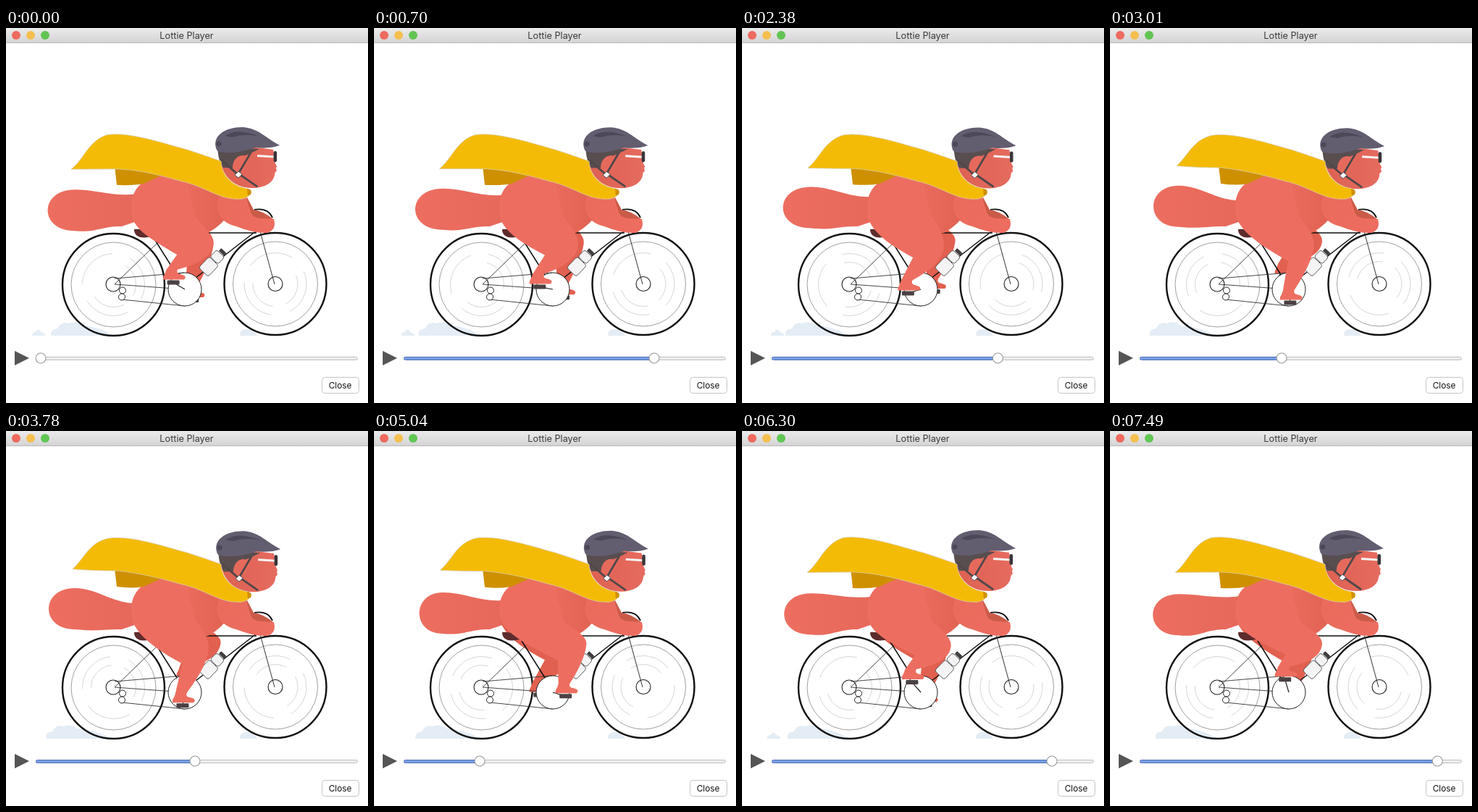
Write an HTML page with a canvas that moves like this. It is 500 by 518 pixels and loops after 7.56 s.

```html
<!DOCTYPE html>
<html lang="en">
<head>
<meta charset="utf-8">
<title>Lottie Player</title>
<style>
html, body { margin: 0; width: 100%; height: 100%; overflow: hidden; background: #fff; }
canvas { display: block; }
</style>
</head>
<body>
<canvas id="stage" width="500" height="518"></canvas>
<script>
const ctx = document.getElementById('stage').getContext('2d');
const LOOP = 7560, STEP = 70, RANGE = 431, TURN = Math.PI * 2;
const REST = 0.838 * TURN;
const SKIN = '#ed6e60', FAR_SKIN = '#e2604f', INK = '#111';
const HUB = { x: 247, y: 361 };

// the playback speed drifts: [time in ms, px travelled by the slider]
const PACE = [[0, 0], [1400, 678], [3010, 1482], [3780, 1937], [5040, 2684], [6300, 3397], [LOOP, 9 * RANGE]];

function travelled(t) {
  const i = PACE.findIndex(([time]) => time > t);
  const [t0, d0] = PACE[i - 1], [t1, d1] = PACE[i];
  return d0 + (d1 - d0) * (t - t0) / (t1 - t0);
}

const rad = deg => deg * Math.PI / 180;
const wave = (phase, peak) => Math.cos(phase - rad(peak));

// the knee follows the foot around the crank
function legPose(phase) {
  const a = phase - rad(79) + rad(14) * Math.sin(phase);
  const dx = 18.5 * Math.cos(a), dy = 18.5 * Math.sin(a);
  return {
    x: HUB.x + dx, y: HUB.y + dy,
    kx: 288 + 0.42 * dx - 0.4 * dy, ky: 299 - 0.25 * dx + 0.25 * dy,
    bx: 245 + 0.5 * dx, by: 315 + 0.35 * dy
  };
}

function shape(path, fill, stroke, width = 1) {
  const p = new Path2D(path);
  if (fill) { ctx.fillStyle = fill; ctx.fill(p); }
  if (stroke) { ctx.strokeStyle = stroke; ctx.lineWidth = width; ctx.stroke(p); }
}

function circle(x, y, r, ...paint) {
  shape(`M${x + r} ${y}A${r} ${r} 0 1 1 ${x - r} ${y}A${r} ${r} 0 1 1 ${x + r} ${y}Z`, ...paint);
}

function box(x, y, w, h, r, fill, stroke, width = 1) {
  ctx.beginPath();
  ctx.roundRect(x, y, w, h, r);
  ctx.fillStyle = fill;
  ctx.fill();
  if (stroke) { ctx.strokeStyle = stroke; ctx.lineWidth = width; ctx.stroke(); }
}

function label(text, x, y, size, color) {
  ctx.font = `${size}px Inter, sans-serif`;
  ctx.textAlign = 'center';
  ctx.fillStyle = color;
  ctx.fillText(text, x, y);
}

function gradient(x0, y0, x1, y1, from, to) {
  const g = ctx.createLinearGradient(x0, y0, x1, y1);
  g.addColorStop(0, from);
  g.addColorStop(1, to);
  return g;
}

function wheel(x, y, turn) {
  circle(x, y, 70.5, null, INK, 2.4);
  circle(x, y, 58.5, null, '#777', 0.7);
  ctx.strokeStyle = '#ccc';
  ctx.lineWidth = 0.8;
  for (let i = 0; i < 5; i++) {
    const from = turn + i * 2.1;
    ctx.beginPath();
    ctx.arc(x, y, i % 2 ? 31 : 43, from, from + 1.5);
    ctx.stroke();
  }
}

function clouds(phase) {
  const x = 59 - 4 * wave(phase, 150), c = '#e4edf5';
  shape(`M${x} 425Q${x - 2} 416 ${x + 9} 415Q${x + 13} 405 ${x + 24} 408Q${x + 34} 404 ${x + 43} 411Q${x + 66} 412 148 425Z`, c);
  if (phase > 3.4 && phase < 5.7) {
    const p = 62 - phase * 5;
    shape(`M${p} 425Q${p} 420 ${p + 5} 420Q${p + 9} 413 ${p + 13} 420Q${p + 18} 421 ${p + 19} 425Z`, c);
  }
  shape('M323 425Q322 417 331 416Q340 414 347 425Z', c);
}

function leg({ x, y, kx, ky, bx, by }, color) {
  box(x - 8.5, y - 3, 17, 6, 1, '#4b4142');
  shape(`M173 250C171 278 ${bx - 32} ${by - 17} ${bx} ${by}L${x - 10} ${y - 17}
    C${x - 11} ${y - 11} ${x - 15} ${y - 9} ${x - 14} ${y - 4}H${x + 15}
    Q${x + 20} ${y - 9} ${x + 11} ${y - 11}Q${x + 3} ${y - 12} ${x + 6} ${y - 18}
    Q${kx - 3} ${ky + 22} ${kx} ${ky}C${kx + 3} ${ky - 13} 272 272 262 262
    L250 215C195 190 174 225 173 250Z`, color);
}

function tail(phase) {
  const x = 60 + 4 * wave(phase, 75) - 12;
  const y = 250.5 + 4.5 * wave(phase, 10);
  const top = 232.5 - 5.5 * wave(phase, -15);
  shape(`M195 ${top - 2}C155 ${top + 8} 130 ${y - 29} 95 ${y - 29}
    C${x} ${y - 29} ${x} ${y + 28} 95 ${y + 28}
    C125 ${y + 31} 130 274 160 274L195 262Z`,
    gradient(60, 0, 185, 0, SKIN, '#e6685a'));
}

function bike(foot) {
  shape('M150 354L210 296M150 354L247 361M150 346L246 338M160 375L247 384', null, '#333', 0.9);
  circle(148, 354, 10, null, '#222', 1.1);
  circle(161, 362.5, 4.5, '#fff', '#222', 1);
  circle(160, 371.5, 4.5, '#fff', '#222', 1);
  shape('M200 283H346M204 290L238 344M346 280L262 345', null, INK, 1.5);
  shape('M351 281L371 354', null, '#333', 1);
  circle(372, 353.5, 10, null, '#222', 1.1);
  shape('M343 251Q362 248 368 262', null, INK, 1.8);
  shape('M177 278Q190 276 204 287Q188 292 181 287Q177 284 177 278Z', '#5d2c2c');
  circle(HUB.x, HUB.y, 23, '#fff', '#222', 1);
  shape(`M${HUB.x} ${HUB.y}L${foot.x} ${foot.y}`, null, '#222', 1.2);

  ctx.save();
  ctx.translate(279.5, 330);
  ctx.rotate(0.76);
  box(-9, -11, 18, 21, 3, '#f4f4f4', '#555', 0.9);
  box(-8, -25, 15, 13, 3, '#f4f4f4', '#555', 0.9);
  box(-5, -31, 10, 5, 1, '#433f40');
  ctx.restore();
}

function head() {
  shape(`M295 172C294 200 312 221 340 221C358 221 370 213 371 202Q371 199 374 197
    Q372 193 374 191Q371 187 371 182L369 168L310 160Z`,
    gradient(300, 0, 372, 0, '#dd6253', '#e66b5f'));
  shape('M292 164Q293 185 300 193L314 193Q320 178 336 174L350 167Z', '#584e4f');
  shape('M313 194C312 184 319 175 328 176Q336 178 335 185L324 203Z', '#e66a5c');
  shape('M338 172L321 201L347 219M297 182L320 202', null, '#51474a', 2.8);
  shape('M321 198L326 202L321 207L316 203Z', '#fff', '#51474a', 1);
  shape('M347 176.5L371 178', null, '#f7f4f4', 3);
  box(369.5, 170, 4.5, 15, 2.2, '#3a3538');
  shape('M290 166C285 149 302 137 326 137C349 138 358 152 378 162Q365 167 345 165Q316 175 296 171Q291 171 290 166Z', '#635d70');
  shape('M302 149Q320 137 350 150Q330 145 312 151Z', '#4d4858');
  circle(294, 160, 3.5, '#4d4858');
}

function cape(lift) {
  const x = 91 - lift, y = 193 + lift * 2.5;
  shape(`M150 190L153 ${216 + lift}Q175 218 190 215L218 202Z`, '#cf9000');
  shape(`M${x} ${y}C108 ${y - 14} 114 155 140 ${148 - lift * 0.6}C170 143 220 160 250 168
    Q275 176 297 184C298 203 311 218 334 222Q341 233 326 236C296 239 277 219 240 211
    C205 201 180 196 155 ${194 + lift}Q120 ${194 + lift} ${x} ${y}Z`, '#f4bb06', '#d8cda8', 0.8);
  shape('M333 222Q341 222 338 230L334 232Z', '#cf9000');
}

function rider(foot, lift) {
  shape('M332 232L342 251Q356 253 369 264L370 270Q345 272 334 260Z', '#cb5b49');
  shape('M173 250C171 220 195 200 230 203L325 225L312 252Q299 272 279 283L240 290Z',
    gradient(235, 0, 300, 0, SKIN, '#e26353'));
  shape('M296 228C284 252 298 270 318 274Q343 284 361 283Q374 279 370 264L355 263Q343 264 338 255L332 234Z',
    gradient(290, 240, 370, 270, '#ea6a5c', SKIN));
  leg(foot, SKIN);
  ctx.save();
  ctx.translate(0.6 - lift * 0.6, 0.6 - lift * 0.6);
  head();
  ctx.restore();
  cape(lift);
}

function controls(px) {
  const x = 48 + px;
  ctx.fillStyle = gradient(0, 0, 0, 21, '#ebebeb', '#d3d3d3');
  ctx.fillRect(0, 0, 500, 21);
  ctx.fillStyle = '#b9b9b9';
  ctx.fillRect(0, 20, 500, 1);
  ['#ee6a5f', '#f5bf4f', '#61c554'].forEach((color, i) => circle(14 + 20 * i, 10, 6, color));
  label('Lottie Player', 249.5, 15, 12.7, '#3a3a3a');

  shape('M12 446L32 456L12 466Z', '#555');
  box(41.5, 454.5, 444, 4, 2, '#eee', '#c0c0c0');
  if (px > 0) box(41.5, 454.5, x - 41, 4, 2, '#779ee2', '#5072b8');
  circle(x, 456, 7, '#fff', '#999', 1.1);
  box(436.5, 482.5, 51, 22, 4, '#fff', '#c4c4c4');
  label('Close', 461.5, 498, 11.8, '#111');
}

function draw(time) {
  const t = Math.floor(time % LOOP / STEP) * STEP;
  const px = travelled(t) % RANGE;
  // the figure still rests in its old pose when the slider starts
  const phase = t ? px / RANGE * TURN : REST;
  const foot = legPose(phase);
  const lift = wave(phase, -26);

  ctx.fillStyle = '#fff';
  ctx.fillRect(0, 0, 500, 518);
  clouds(phase);
  wheel(148.5, 354.5, phase);
  wheel(372, 353.5, phase + 0.6);
  tail(phase);
  leg(legPose(phase + Math.PI), FAR_SKIN);
  bike(foot);
  rider(foot, lift);
  controls(px);
}

const start = performance.now();
function tick() {
  draw(performance.now() - start);
  requestAnimationFrame(tick);
}
tick();
</script>
</body>
</html>
```
